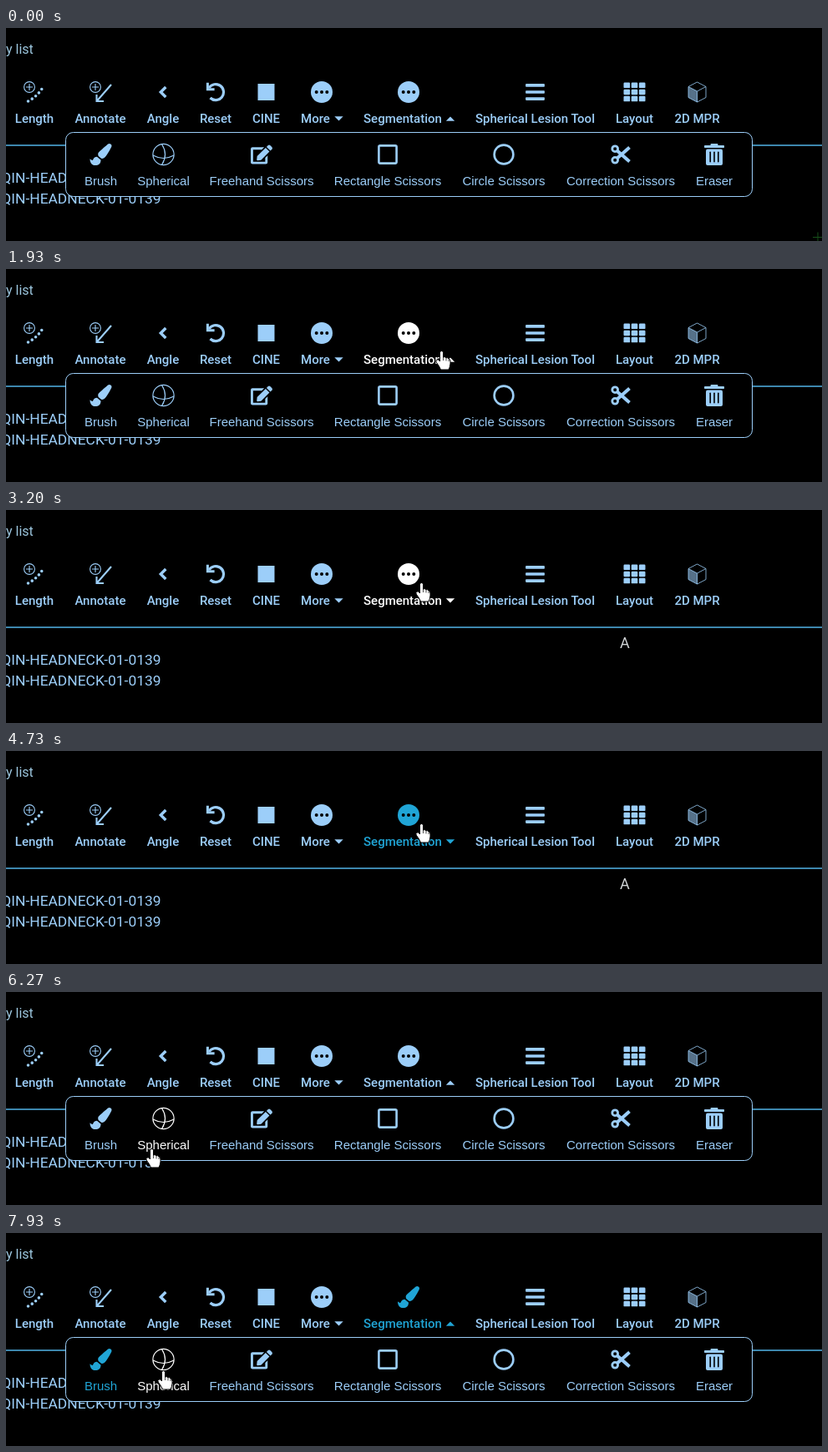
These frames come from a looping animation (977 by 256 pixels, 8000 ms). An HTML page:

```html
<!DOCTYPE html>
<html lang="en">
<head>
<meta charset="utf-8">
<title>Segmentation toolbar</title>
<style>
html, body { margin: 0; width: 100%; height: 100%; overflow: hidden; background: #000; }
svg { display: block; width: 977px; height: 256px; color: #9ccef9; fill: currentColor; }
.tool { font: 500 15px Roboto, sans-serif; text-anchor: middle; }
.sub { font: 15px "Liberation Sans", Arial, sans-serif; text-anchor: middle; }
.study { font: 17.4px Roboto, sans-serif; text-anchor: end; }
.line { fill: none; stroke: currentColor; }
.hole { fill: #000; }
</style>
</head>
<body>
<svg viewBox="0 0 977 256">
  <text x="0" y="31" style="font:16px Roboto,sans-serif" fill="#9cc6de">y list</text>
  <path d="M0 141H977" stroke="#3d87ad" stroke-width="2"/>
  <text class="study" x="185.5" y="186">QIN-HEADNECK-01-0139</text>
  <text class="study" x="185.5" y="211">QIN-HEADNECK-01-0139</text>
  <text x="735" y="166" style="font:18px Roboto,sans-serif" fill="#d2d6d8">A</text>
  <g id="toolbar"></g>
  <g id="panel">
    <rect x="71.5" y="125.5" width="822" height="77" rx="9" fill="#000" stroke="currentColor"/>
  </g>
  <path id="cross" d="M-6 0H6M0-6V6" stroke="#17501a"/>
  <g id="hand" stroke="#000">
    <path fill="#fff" d="M-1.5 2.5Q-1.5 .5 .5 .5T2.5 2.5V8Q4.5 7 6 8.8Q8 8 9 10Q11 10 11 13V16Q10.5 20 9 23H-.5Q-2 19-5.5 14.5Q-7 12-5 11T-1.5 13Z"/>
    <path d="M2.5 8V12M6 9V12.5M9 10.5V13" stroke-width=".7"/>
  </g>
</svg>
<script>
const NORMAL = '#9ccef9', HOVER = '#fff', ACTIVE = '#20a5d6';
const TICK = 1000 / 15, LOOP = 8000;
const el = id => document.getElementById(id);

// Icons are drawn around their own centre.
const line = (d, width, extra = '') => `<path class="line" d="${d}" stroke-width="${width}" ${extra}/>`;
const rect = (x, y, w, h, rx = 0, cls = '') =>
  `<rect class="${cls}" x="${x}" y="${y}" width="${w}" height="${h}" rx="${rx}"/>`;
const marker = line('M-10-6H-2M-6-10V-2', 1.1) + '<circle class="line" cx="-6" cy="-6" r="6.4" stroke-width="1.1"/>';
const grid = [0, 1, 2].flatMap(r => [0, 1, 2].map(c => rect(-13 + 9.2 * c, -11.4 + 8.13 * r, 7.6, 6.5, 1.2))).join('');
const icons = {
  length: marker + line('M-7.5 11Q4 5 11-7', 3.6, 'stroke-linecap="round" stroke-dasharray="0 5.5"'),
  annotate: marker + line('M13-9L-4 10.5M-4.5 3V11H4', 2.1),
  angle: line('M3.3-6L-2.7 0L3.3 6', 3.4),
  reset: line('M-9.6-11.3V-3.2H-1.4', 3) + line('M-8-5A9.5 9.5 0 1 1-6.5 7', 3.2),
  cine: rect(-10, -10, 20, 20),
  dots: '<circle r="13"/>' + [-6.3, 0, 6.3].map(x => `<circle class="hole" cx="${x}" r="2"/>`).join(''),
  bars: [-8.1, 0, 8.1].map(y => rect(-11.4, y - 1.8, 22.8, 3.6, .8)).join(''),
  grid,
  cube: '<path d="M-10.5-6.5L0-1V12L-10.5 6.5Z" opacity=".55"/>' +
    line('M0-12L10.5-6.5V6.5L0 12L-10.5 6.5V-6.5ZM-10.5-6.5L0-1L10.5-6.5M0-1V12', .8),
  brush: `<path transform="scale(.0508) translate(-256 -256)" d="M167 309C127 312 90 327 70 382C67 388 62 392 55 392
    C44 392 10 364 0 357C0 440 38 512 128 512C204 512 256 468 256 392L255 383ZM458 0C443 0 429 7 418 16
    C213 199 192 203 192 257Q192 272 201 296L265 349Q275 352 287 352C349 352 385 307 498 96C506 81 512 66 512 50
    C512 21 486 0 458 0Z"/>`,
  sphere: '<circle class="line" r="12.6" stroke-width="1.2"/>' + line('M-2-12.5Q6 0-2 12.5M-12.5 1Q0 8 12.5 1', 1.2),
  edit: `<path transform="scale(.0451) translate(-288 -256)" d="M396 78L498 180L274 406L182 416Q159 417 160 394L170 302Z
    M565 60L516 11Q488-10 461 11L419 54L522 157L565 115Q587 88 565 60ZM384 346V448H64V128H294L358 64H48Q0 64 0 112
    V464Q0 512 48 512H400Q448 512 448 464V282Z"/>`,
  square: '<rect class="line" x="-10.6" y="-10.6" width="21.2" height="21.2" rx="1.5" stroke-width="2.6"/>',
  circle: '<circle class="line" r="11.4" stroke-width="2.6"/>',
  scissors: [-1, 1].map(s => `<circle class="line" cx="-6.8" cy="${6.8 * s}" r="3.4" stroke-width="2.8"/>` +
    line(`M-4.5 ${4.8 * s}L10.5 ${-8.6 * s}`, 4)).join(''),
  trash: rect(-12, -11, 24, 3, .8) + rect(-4.5, -13, 9, 3, 1) + rect(-10, -6.5, 20, 19.5, 2) +
    [-5.6, -.8, 4].map(x => rect(x, -3.5, 1.6, 13, .8, 'hole')).join('')
};

function addItem(parent, cls, y, label, x, icon, iconX = x) {
  const group = document.createElementNS('http://www.w3.org/2000/svg', 'g');
  group.innerHTML = `<g class="icon" transform="translate(${iconX} ${y})">${icons[icon]}</g>
    <text class="${cls}" x="${x}" y="${y + 37}">${label}</text>`;
  el(parent).append(group);
  return group;
}
const tools = [
  ['Length', 34, 'length'], ['Annotate', 113, 'annotate'], ['Angle', 188, 'angle'],
  ['Reset', 251, 'reset'], ['CINE', 311.5, 'cine'], ['More', 370.5, 'dots', 378],
  ['Segmentation', 475, 'dots', 482], ['Spherical Lesion Tool', 633.5, 'bars'],
  ['Layout', 752.5, 'grid'], ['2D MPR', 827.5, 'cube']
].map(args => addItem('toolbar', 'tool', 77, ...args));
const subtools = [
  ['Brush', 113.5, 'brush'], ['Spherical', 188.5, 'sphere'], ['Freehand Scissors', 306, 'edit'],
  ['Rectangle Scissors', 457, 'square'], ['Circle Scissors', 596, 'circle'],
  ['Correction Scissors', 736, 'scissors'], ['Eraser', 848, 'trash']
].map(args => addItem('panel', 'sub', 152, ...args));

const segmentation = tools[6], brush = subtools[0];
const caret = '<path class="caret" d="M-5.2-2.7H5.2L0 2.6Z" ';
tools[5].insertAdjacentHTML('beforeend', caret + 'transform="translate(398.5 109)"/>');
segmentation.insertAdjacentHTML('beforeend', caret + '/>');
const segCaret = segmentation.querySelector('.caret');
const segIcon = segmentation.querySelector('.icon');
segCaret.setAttribute('transform', 'translate(532 109)');
const items = [...tools, ...subtools].map(group => ({ group, box: group.getBBox() }));

// Pointer keys: [tick, x, y]
const handPath = [[24, 650, 194], [27, 598, 112], [29, 521, 98], [32, 497, 87], [91, 497, 87],
  [94, 174, 188], [100, 120, 169], [117, 120, 169], [119, 188, 165]];
const crossPath = [[0, 972, 251.5], [16, 972, 251.5], [19, 883, 251.5]];

function pointOn(path, tick) {
  const next = path.findIndex(key => key[0] > tick);
  if (next < 0) return path.at(-1).slice(1);
  const [t0, x0, y0] = path[next - 1], [t1, x1, y1] = path[next];
  const k = (tick - t0) / (t1 - t0);
  return [x0 + (x1 - x0) * k, y0 + (y1 - y0) * k];
}
function place(node, path, tick, visible) {
  node.style.display = visible ? '' : 'none';
  if (!visible) return null;
  const [x, y] = pointOn(path, tick).map(v => Math.round(v * 2) / 2);
  node.setAttribute('transform', `translate(${x} ${y})`);
  return [x, y];
}
const contains = (box, [x, y]) =>
  x > box.x - 6 && x < box.x + box.width + 6 && y > box.y - 4 && y < box.y + box.height + 4;

let usedIcon = 'dots';
function render(time) {
  const tick = Math.floor((time % LOOP + 4) / TICK);
  place(el('cross'), crossPath, tick, tick < 20);
  const pointer = place(el('hand'), handPath, tick, tick >= 24);

  const pressed = tick === 45 || tick === 46 || tick === 71 || tick === 72;
  const open = tick < 46 || tick >= 72;
  const fade = tick < 60 ? (48 - tick) / 3 : (tick - 71) / 3;
  el('panel').style.opacity = Math.max(0, Math.min(1, fade));

  for (const { group, box } of items) {
    const active = group === segmentation ? pressed || tick >= 105 : group === brush && tick >= 104;
    group.style.color = active ? ACTIVE : pointer && contains(box, pointer) ? HOVER : NORMAL;
  }
  segCaret.setAttribute('transform', `translate(532 109) scale(1 ${open ? -1 : 1})`);
  const icon = tick >= 105 ? 'brush' : 'dots';
  if (icon !== usedIcon) segIcon.innerHTML = icons[usedIcon = icon];
}

const start = performance.now();
function frame() {
  render(performance.now() - start);
  requestAnimationFrame(frame);
}
frame();
</script>
</body>
</html>
```
